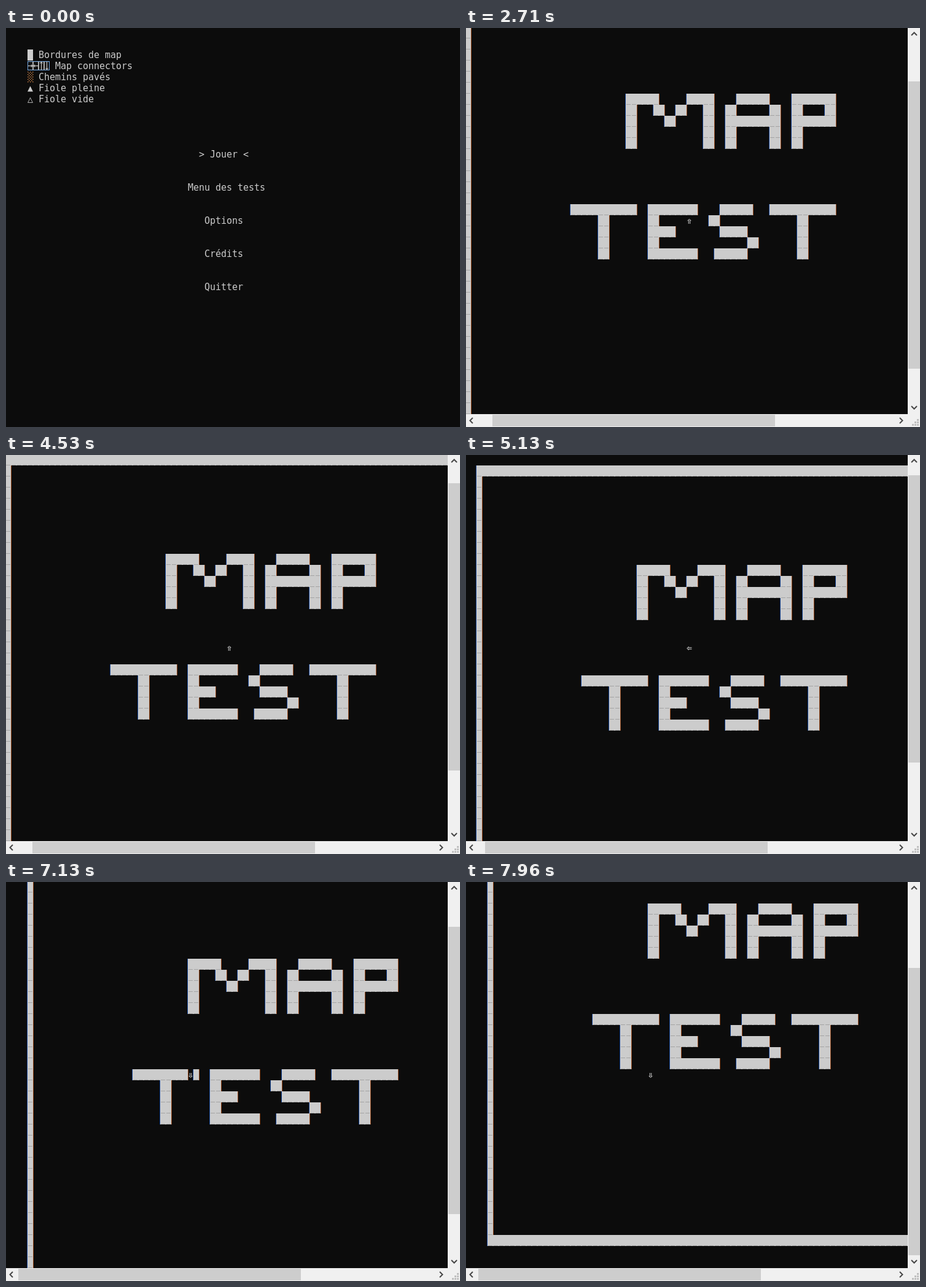
Animation, 739 px wide and 650 px high, one loop 8 s. Source, as an HTML page with a canvas:

```html
<!DOCTYPE html>
<html lang="fr">
<head>
<meta charset="utf-8">
<title>Console</title>
<style>
html, body { margin: 0; width: 739px; height: 650px; overflow: hidden; background: #0c0c0c; }
canvas { display: block; }
</style>
</head>
<body>
<canvas id="stage" width="739" height="650"></canvas>
<script>
const ctx = document.getElementById('stage').getContext('2d');
const LOOP = 8000, CW = 9, CH = 18, LEFT = 8, TOP = 17;
const BG = '#0c0c0c', FG = '#cccccc', GREEN = '#13a10e', BLUE = '#123f8c', ORANGE = '#94481c';
const VIEW_W = 719, VIEW_H = 629, HERO_Y = 305;

const MENU = [['Jouer', 36, 10], ['Menu des tests', 32, 13], ['Options', 35, 16], ['Crédits', 35, 19], ['Quitter', 35, 22]];
const LEGEND = ['Bordures de map', 'Map connectors', 'Chemins pavés', 'Fiole pleine', 'Fiole vide'];

const MAP = [
  '          ######     #####    ######    ########',
  '          ##   ##  ##   ##  ##      ##  ##    ##',
  '          ##     ##     ##  ##########  ########',
  '          ##            ##  ##      ##  ##',
  '          ##            ##  ##      ##  ##'];
const TEST = [
  '############  #########    ######   ############',
  '     ##       ##         ##              ##',
  '     ##       #####        #####         ##',
  '     ##       ##                ##       ##',
  '     ##       #########   ######         ##'];

const world = Array.from({ length: 40 }, (_, row) => {
  if (row === 0 || row === 39) return '#'.repeat(110);
  return '#' + ' '.repeat(18) + (MAP[row - 9] || TEST[row - 19] || '');
});

// Times at which the hero takes a step in each direction
const MAP_START = 2710;
const WALK = [
  ['up', [4220, 4330, 4530, 4730]],
  ['left', [4930, 5130, 5330, 5530, 5630, 5820, 6040, 6140, 6340, 6540, 6640]],
  ['down', [6840, 6990, 7130, 7330, 7440, 7640, 7840, 7960]]
];
const ANGLE = { left: 0, up: Math.PI / 2, down: -Math.PI / 2 };

function rect(x, y, w, h, color) {
  ctx.fillStyle = color;
  ctx.fillRect(x, y, w, h);
}

function line(points, color, width) {
  ctx.beginPath();
  points.forEach(([x, y]) => ctx.lineTo(x, y));
  ctx.strokeStyle = color;
  ctx.lineWidth = width;
  ctx.stroke();
}

function text(str, col, row, color = FG) {
  ctx.fillStyle = color;
  ctx.font = '15px "DejaVu Sans Mono", monospace';
  [...str].forEach((ch, i) => ctx.fillText(ch, LEFT + (col + i) * CW, TOP + row * CH + 14));
}

function blocks(x, y, count) {
  const w = count * CW;
  rect(x - 1, y, 1, CH, BLUE);
  rect(x + w, y, 1, CH, ORANGE);
  rect(x, y, w, CH, FG);
  for (let i = 0; i < count; i++) rect(x + i * CW + 1, y + CH - 1, CW - 2, 1, '#a4a4a4');
}

function drawLegend() {
  LEGEND.forEach((label, i) => text(label, i === 1 ? 8 : 5, i + 1));
  rect(35, 35, CW, CH, FG);
  text('⍈⍇⍐⍗', 3, 2);
  ctx.strokeStyle = '#6fa3dc';
  ctx.lineWidth = 1;
  ctx.strokeRect(35.5, 54.5, 35, 14);
  for (let y = 0; y < CH; y += 2)
    for (let x = y % 4 ? 2 : 0; x < CW; x += 4) rect(35 + x, 71 + y, 1.5, 1.5, '#b8743f');
  text('▲', 3, 4);
  text('△', 3, 5);
}

function drawMenu(selected) {
  drawLegend();
  MENU.forEach(([label, col, row], i) => {
    if (i === selected) text(`> ${label} <`, col - 2, row);
    else text(label, col, row);
  });
}

function drawTests(selected) {
  text('Menus', 36, 14, selected === 0 ? GREEN : FG);
  text('Map', 37, 17, selected === 1 ? GREEN : FG);
}

function heroAt(t) {
  const s = { row: 4, col: 4, x: 359, dir: 'up' };
  for (const [dir, times] of WALK) {
    for (const time of times) {
      if (t < time) return s;
      s.dir = dir;
      if (dir === 'up') s.row--;
      else if (dir === 'down') s.row++;
      else if (s.col > 0) s.col--;
      else s.x -= CW;
    }
  }
  return s;
}

function drawHero(x, dir) {
  ctx.save();
  ctx.translate(x + 4.5, 315);
  ctx.rotate(ANGLE[dir]);
  line([[-2.5, -1.2], [4, -1.2]], FG, 1);
  line([[-2.5, 1.2], [4, 1.2]], FG, 1);
  line([[-0.8, -3], [-3.8, 0], [-0.8, 3]], FG, 1);
  ctx.restore();
}

function drawScrollbars(row, col) {
  rect(VIEW_W, 0, 20, 650, '#f0f0f0');
  rect(0, VIEW_H, 739, 21, '#f0f0f0');
  rect(720, Math.round(33 + 13.4 * row), 19, 468, '#cdcdcd');
  rect(Math.round(20 + 5.7 * col), 630, 460, 19, '#cdcdcd');
  const ink = '#484848';
  line([[725, 12], [729.5, 7.5], [734, 12]], ink, 2);
  line([[725, 616], [729.5, 620.5], [734, 616]], ink, 2);
  line([[11, 635], [6.5, 639.5], [11, 644]], ink, 2);
  line([[706, 635], [710.5, 639.5], [706, 644]], ink, 2);
  for (let i = 0; i < 3; i++)
    for (let j = 2 - i; j < 3; j++) rect(726 + j * 4, 637 + i * 4, 3, 3, '#bfbfbf');
}

function drawMap(t) {
  const s = heroAt(t);
  const x0 = 35 - s.col * CW, y0 = TOP - s.row * CH;
  const heroCol = (s.x - x0) / CW, heroRow = (HERO_Y - y0) / CH;
  ctx.save();
  ctx.beginPath();
  ctx.rect(0, 0, VIEW_W, VIEW_H);
  ctx.clip();
  world.forEach((cells, row) => {
    if (row === heroRow) cells = cells.slice(0, heroCol) + ' ' + cells.slice(heroCol + 1);
    for (const run of cells.matchAll(/#+/g)) blocks(x0 + run.index * CW, y0 + row * CH, run[0].length);
  });
  drawHero(s.x, s.dir);
  ctx.restore();
  drawScrollbars(s.row, s.col);
}

function draw(t) {
  rect(0, 0, 739, 650, BG);
  if (t < 1510) drawMenu(t < 1010 ? 0 : 1);
  else if (t < MAP_START) drawTests(t < 2200 ? 0 : 1);
  else drawMap(t);
}

const start = performance.now();
function tick() {
  draw((performance.now() - start) % LOOP);
  requestAnimationFrame(tick);
}
tick();
</script>
</body>
</html>
```
